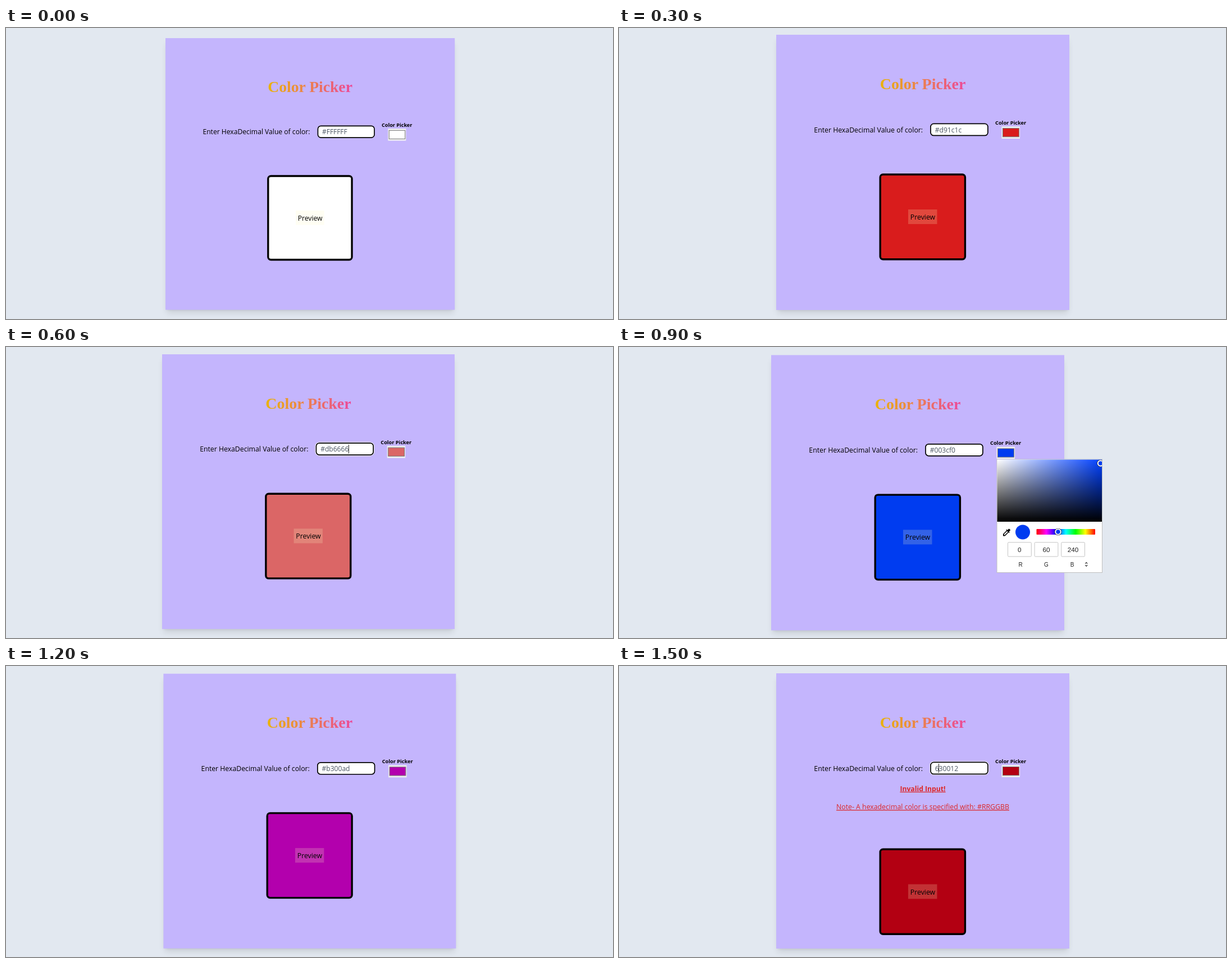
An HTML page that plays this animation: 1081 px wide and 518 px high, repeating every 1800 ms.

```html
<!DOCTYPE html>
<html lang="en">
<head>
<meta charset="utf-8">
<title>Color Picker</title>
<style>
  html, body { margin: 0; width: 100%; height: 100%; overflow: hidden; background: #e2e8f0; }
  svg { display: block; width: 1081px; height: 518px; }
  text { font: 500 12.3px "Open Sans", "Noto Sans", sans-serif; white-space: pre; }
  .mid { text-anchor: middle; }
  .title { font: 700 28px "Liberation Serif", serif; fill: url(#sunset); }
  .value { font-weight: 400; font-size: 12.1px; fill: #4b5563; }
  .caption { font-weight: 700; font-size: 9.2px; }
  .error { fill: #dc2626; text-decoration: underline; }
  .strong { font-weight: 700; font-size: 12.2px; }
  .channel { font: 400 11.7px "Liberation Sans", sans-serif; fill: #222; }
  .unit { font-size: 10px; }
</style>
</head>
<body>
<svg viewBox="0 0 1081 518">
  <defs>
    <linearGradient id="sunset"><stop stop-color="#eab308"/><stop offset="1" stop-color="#ec4899"/></linearGradient>
    <linearGradient id="saturation"><stop stop-color="#fff"/><stop offset="1" stop-color="#0040ff"/></linearGradient>
    <linearGradient id="shade" x2="0" y2="1"><stop stop-opacity="0"/><stop offset="1"/></linearGradient>
    <linearGradient id="hues"></linearGradient>
    <clipPath id="field"><rect x="673.5" y="200.5" width="186.5" height="110.5"/></clipPath>
  </defs>
  <g id="stage"></g>
</svg>
<script>
const HOLD = 300;
const scenes = [
  { x: 284, y: 18, scale: 0.987, color: '#ffffff', value: '#FFFFFF' },
  { x: 280, y: 12, scale: 1, color: '#d91c1c', value: '#d91c1c' },
  { x: 278, y: 13, scale: 0.998, color: '#db6666', value: '#db6666', caret: 333 },
  { x: 271, y: 14.4, scale: 1, color: '#003cf0', value: '#003cf0', picker: true },
  { x: 280.4, y: 13.7, scale: 0.998, color: '#b300ad', value: '#b300ad' },
  { x: 280, y: 13, scale: 1, color: '#b30012', value: '630012', caret: 289.5, error: true },
];

const rect = (x, y, width, height, fill, extra = '') =>
  `<rect x="${x}" y="${y}" width="${width}" height="${height}" fill="${fill}" ${extra}/>`;
const text = (x, y, content, style = '') => `<text x="${x}" y="${y}" class="${style}">${content}</text>`;
const circle = (x, y, r, fill, extra = '') => `<circle cx="${x}" cy="${y}" r="${r}" fill="${fill}" ${extra}/>`;

const knob = (x, y, color) =>
  circle(x, y, 6.3, '#222') + circle(x, y, 4.7, color, 'stroke="#fff" stroke-width="2"');

function errorMessage() {
  return text(261, 209.8, 'Invalid Input!', 'mid error strong') +
    text(261, 242, 'Note- A hexadecimal color is specified with: #RRGGBB', 'mid error');
}

function panel({ color, value, caret, error }) {
  const drop = error ? 64.5 : 0;
  return rect(2.4, 10.4, 517.2, 485.2, '#000', 'opacity=".1" style="filter:blur(6px)"') +
    rect(3.2, 6.4, 515.6, 483.6, '#000', 'opacity=".1" style="filter:blur(2.4px)"') +
    rect(0, 0, 522, 490, '#c4b5fd') +
    text(261, 97, 'Color Picker', 'mid title') +
    text(67.3, 173.7, 'Enter HexaDecimal Value of color:') +
    (caret ? rect(273.3, 156.8, 105.2, 24.2, '#fff', 'rx="7"') : '') +
    rect(275, 158.4, 101.9, 21, '#fff', 'rx="5.5" stroke="#000" stroke-width="1.7"') +
    text(282.7, 173.7, value, 'value') +
    (caret ? rect(caret - 0.5, 161, 1, 16, '#222') : '') +
    text(417.6, 160, 'Color Picker', 'mid caption') +
    rect(401.5, 163.2, 32.5, 21.8, '#efefef') +
    rect(403.5, 166.5, 28.8, 15.2, color, 'stroke="#767676"') +
    (error ? errorMessage() : '') +
    `<g transform="translate(0 ${drop})">` +
      rect(185.2, 248.7, 151.2, 151, color, 'rx="5" stroke="#000" stroke-width="3.4"') +
      rect(235, 311, 51.5, 26, '#fef9c3', 'opacity=".2"') +
      text(261, 329, 'Preview', 'mid') +
    '</g>';
}

function pickerPopup(color) {
  const channels = [['R', 0, 715], ['G', 60, 761], ['B', 240, 807]];
  return rect(673, 200, 187.5, 201.5, '#fff', 'stroke="#bfbfbf"') +
    rect(673.5, 200.5, 186.5, 110.5, 'url(#saturation)') +
    rect(673.5, 200.5, 186.5, 110.5, 'url(#shade)') +
    `<g clip-path="url(#field)">${knob(857.5, 207, color)}</g>` +
    `<path transform="translate(681.8 321.3) scale(.72)" d="M20.7 5.6l-2.3-2.3a1 1 0 0 0-1.4 0l-3.1 3.1
      -2-1.9-1.4 1.4 1.4 1.4L3 16.2V21h4.8l8.9-8.9 1.4 1.4 1.4-1.4-1.9-1.9 3.1-3.1a1 1 0 0 0 0-1.5z
      M6.9 19L5 17.1l8.1-8.1 1.9 1.9z"/>` +
    circle(719, 329.5, 13, color) +
    rect(743.5, 324, 104.5, 10, 'url(#hues)', 'rx="1"') +
    knob(782, 329, color) +
    channels.map(([unit, level, x], i) =>
      rect(692.5 + 47.6 * i, 347.8, 41.8, 25.2, '#fff', 'rx="1.5" stroke="#c4c4c4"') +
      text(713.3 + 47.6 * i, 364.8, level, 'mid channel') +
      text(x, 390.5, unit, 'mid channel unit')).join('') +
    '<path d="M830.3 385.6l2-2 2 2M830.3 388.2l2 2 2-2" fill="none" stroke="#222" stroke-width="1.1"/>';
}

function render(scene) {
  document.getElementById('stage').innerHTML =
    `<g transform="translate(${scene.x} ${scene.y}) scale(${scene.scale})">${panel(scene)}</g>` +
    (scene.picker ? pickerPopup(scene.color) : '');
}

document.getElementById('hues').innerHTML = Array.from({ length: 7 }, (_, i) =>
  `<stop offset="${i / 6}" stop-color="hsl(${360 - 60 * i},100%,50%)"/>`).join('');

let shown;
function tick() {
  const scene = scenes[Math.floor(performance.now() / HOLD) % scenes.length];
  if (scene !== shown) render(shown = scene);
  requestAnimationFrame(tick);
}
tick();
</script>
</body>
</html>
```
